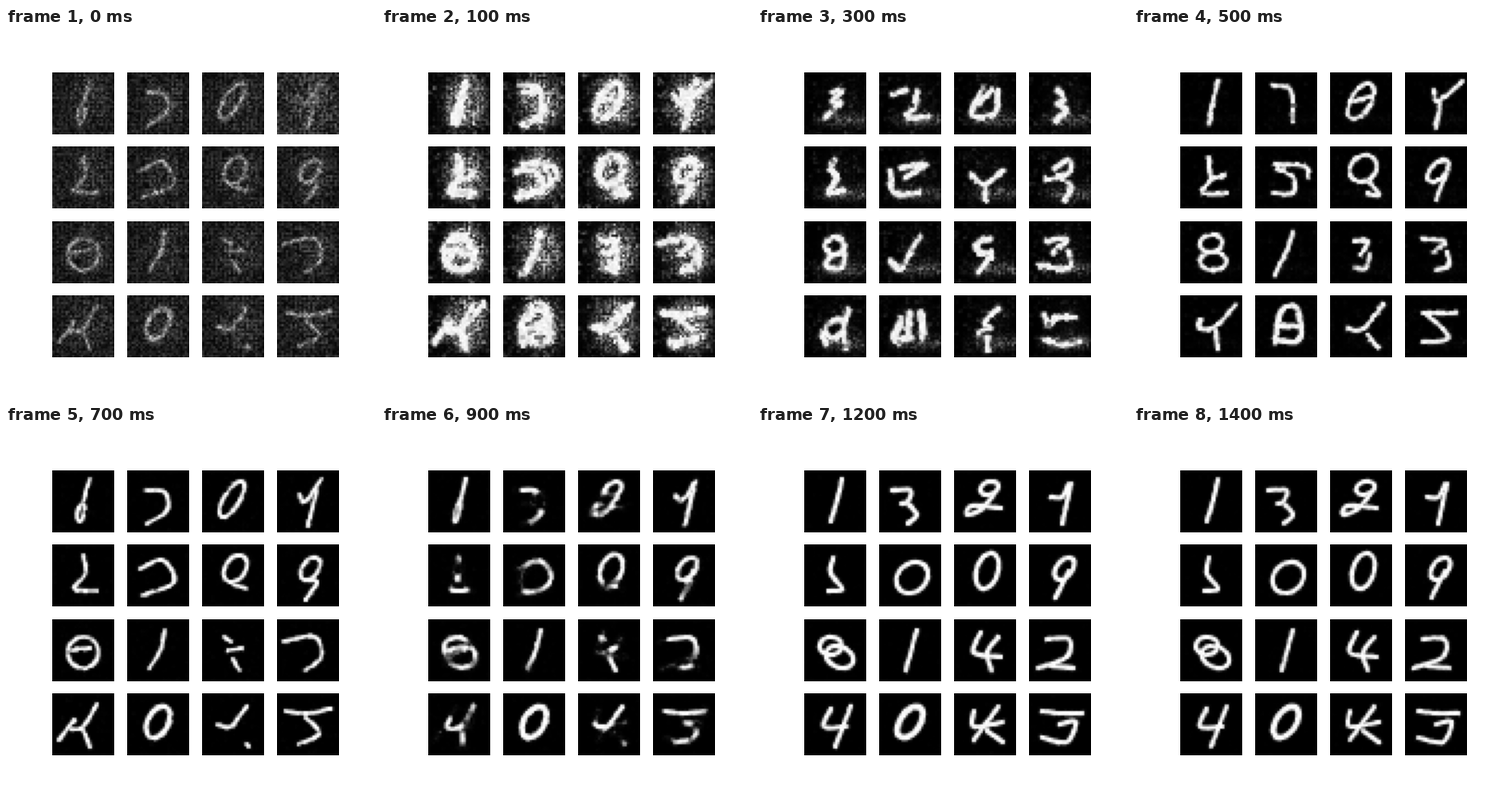
These frames come from a looping animation (400 px wide and 400 px high, 1.5 s). A matplotlib script:

```python
import numpy as np
import matplotlib.pyplot as plt
from matplotlib.animation import FuncAnimation

N = 28
FRAMES = 15
KEYS = [0, 1, 3, 5, 7, 11, 14]
Y, X = np.mgrid[0:N, 0:N] + 0.5
digits = []


def curve(stroke):
    """Catmull-Rom curve through the points of a stroke."""
    pts = np.reshape(stroke, (-1, 2)).astype(float)
    p = np.vstack([pts[:1], pts, pts[-1:]])
    t = np.linspace(0, 1, 24)[:, None]
    parts = [pts]
    for a, b, c, d in zip(p, p[1:], p[2:], p[3:]):
        parts.append(b + 0.5 * t * (c - a + t * (2 * a - 5 * b + 4 * c - d
                                                 + t * (3 * (b - c) + d - a))))
    return np.vstack(parts)


def oval(cx, cy, rx, ry, slant=0.0):
    a = np.linspace(0, 2 * np.pi, 13)
    dy = ry * np.sin(a)
    return np.column_stack([cx + rx * np.cos(a) - slant * dy, cy + dy])


def field(pose, width):
    """Signed soft distance to the strokes, positive inside the ink."""
    pts = np.vstack([curve(s) for s in pose])
    dist = np.hypot(X[..., None] - pts[:, 0], Y[..., None] - pts[:, 1]).min(-1)
    return np.clip(width + 0.5 - dist, -1, 1.25)


def digit(rough, shaped, late, final, bold=1.0):
    """One cell: four drawn poses, the two earliest states derive from them."""
    blob = shaped + late
    poses = [late, blob, rough, shaped, late, final, final]
    widths = [0.9, 1.6, 1.4, 1.05, 0.95, 1.15, 1.05]
    digits.append([field(p, w * bold) for p, w in zip(poses, widths)])


digit([(13, 9, 17, 8, 13, 13, 16, 14, 10, 20)],
      [(17, 4, 15, 12, 13, 23)],
      [(17, 4, 14, 14), oval(13, 19, 1.5, 4, 0.2)],
      [(17, 4, 15, 13, 12, 23)])
digit([(6, 10, 12, 8), (17, 9, 16, 15, 13, 20, 22, 20)],
      [(8, 6, 16, 8, 17, 22)],
      [(9, 9, 17, 10, 18, 18, 9, 24)],
      [(6, 9, 14, 9, 13, 14, 10, 15), (13, 15, 17, 20, 13, 24)])
digit([(13, 7, 8, 19, 18, 19, 20, 8), (11, 14, 17, 8)],
      [oval(14, 13, 5, 8, 0.4), (11, 13, 18, 11)],
      [oval(13.5, 13, 4, 8, 0.5)],
      [oval(16, 8, 4, 3, 0.3), (20, 8, 13, 17, 6, 20, 8, 16, 21, 17)])
digit([(13, 8, 16, 12, 13, 14, 17, 17, 12, 22)],
      [(13, 8, 15, 13, 26, 4), (16, 13, 14, 25)],
      [(10, 11, 13, 14, 20, 4), (18, 9, 14, 25)],
      [(10, 12, 15, 12, 18, 6), (19, 6, 15, 24)])
digit([(14, 6, 12, 10, 15, 14, 11, 21, 18, 20)],
      [(13, 5, 14, 14, 20, 13), (15, 14, 10, 21, 21, 21)],
      [(14, 5, 15, 13, 10, 20, 20, 21)],
      [(13, 6, 12, 13, 17, 20, 11, 21)])
digit([(5, 11, 7, 21, 18, 21), (10, 10, 21, 8, 12, 14)],
      [(9, 8, 22, 9, 24, 14), (10, 10, 17, 14, 17, 21, 8, 21)],
      [(6, 11, 16, 7, 21, 17, 7, 23)],
      [oval(15, 15, 7, 7, 0.2)])
digit([(8, 13, 14, 17, 22, 11), (14, 17, 14, 24)],
      [oval(15, 10, 6, 6, 0.2), (18, 16, 22, 22, 17, 21)],
      [oval(15, 11, 5, 6, 0.3), (14, 18, 20, 20)],
      [oval(15, 12, 5, 8, 0.2)])
digit([(12, 10, 18, 6, 18, 12, 8, 15), (13, 13, 19, 18, 16, 24)],
      [oval(15, 11, 4, 5, 0.5), (20, 8, 14, 24)],
      [oval(15, 11, 4, 5, 0.4), (12, 16, 18, 17, 13, 25)],
      [oval(16, 11, 4, 5, 0.4), (18, 12, 12, 24)])
digit([oval(14, 11, 4, 4), (18, 12, 17, 21, 10, 20, 12, 15)],
      [oval(14, 10, 5, 4, 0.1), oval(15, 18, 6, 4)],
      [oval(14, 15, 7, 7), (9, 14, 17, 13)],
      [oval(12, 12, 5, 4), oval(16, 17, 6, 5, -0.3)])
digit([(18, 7, 10, 22), (5, 18, 9, 22)],
      [(17, 5, 14, 14, 9, 24)],
      [(17, 5, 15, 14, 10, 22)],
      [(17, 5, 12, 23)])
digit([(16, 8, 10, 10, 12, 14, 17, 15, 11, 23)],
      [(11, 9, 17, 9, 14, 15), (18, 15, 16, 21, 11, 21)],
      [(10, 8, 13, 10), (12, 14, 18, 13), (14, 18, 17, 23)],
      [(12, 6, 9, 15, 21, 17), (20, 8, 15, 15, 17, 23)])
digit([(8, 9, 17, 8, 11, 14), (5, 20, 18, 21, 18, 14)],
      [(8, 8, 18, 9, 13, 14), (19, 14, 20, 20, 14, 22)],
      [(3, 10, 17, 8, 20, 17, 13, 23)],
      [(8, 9, 18, 9, 17, 17, 4, 22), (10, 21, 20, 22)])
digit([oval(14, 15, 4, 4, 0.3), (20, 6, 18, 16, 19, 24), (8, 17, 10, 22)],
      [(9, 11, 9, 15, 16, 14, 25, 4), (16, 15, 17, 24)],
      [(10, 12, 3, 21), (8, 16, 14, 15, 20, 5), (14, 16, 17, 24)],
      [(12, 7, 9, 15, 19, 15), (21, 6, 14, 24)])
digit([(10, 11, 7, 20, 14, 19), (14, 8, 13, 19), (19, 8, 20, 19)],
      [(9, 21, 12, 7, 19, 6, 20, 20, 9, 20), (10, 14, 19, 14)],
      [oval(14, 13, 5, 7, 0.3)],
      [oval(14, 13, 5, 7, 0.4)], bold=1.3)
digit([(20, 6, 14, 12, 16, 15, 11, 17), (15, 17, 15, 25)],
      [(8, 15, 15, 15, 24, 4), (17, 18, 22, 24)],
      [(7, 14, 13, 15, 20, 6), (20, 23, 21, 24)],
      [(9, 8, 9, 15, 22, 13), (20, 6, 9, 21), (15, 17, 22, 22)])
digit([(7, 9, 9, 13, 13, 10, 21, 10), (7, 20, 15, 22, 23, 21)],
      [(8, 8, 23, 8), (10, 9, 17, 15, 19, 20, 8, 21)],
      [(4, 8, 14, 9, 24, 7), (13, 11, 19, 18, 10, 23)],
      [(6, 8, 14, 9, 24, 9), (14, 14, 21, 13, 17, 22, 6, 20)])


haze = np.exp(-(((X - 16) / 10) ** 2 + ((Y - 13) / 12) ** 2) ** 2) * (0.35 + 0.65 * X / N)
floor = np.exp(-((Y - 21.5) / 3) ** 2) * np.clip((X - 2) / 12, 0, 1)
mesh = 0.7 + 0.3 * (X % 2 < 1) + 0.25 * (Y % 2 > 1)


def fade(frame, *levels):
    """Level at a frame, holding the last one after the listed keys."""
    return np.interp(frame, KEYS[:len(levels)], levels)


def render(frame, cell):
    rng = np.random.default_rng(100 * frame + cell)
    poses = digits[cell]
    k = min(np.searchsorted(KEYS, frame, side="right") - 1, len(KEYS) - 2)
    u = (frame - KEYS[k]) / (KEYS[k + 1] - KEYS[k])
    f = (1 - u) * poses[k] + u * poses[k + 1]
    ragged = np.kron(rng.normal(size=(N // 2, N // 2)), np.ones((2, 2)))
    f = f + ragged * fade(frame, 0.2, 0.3, 0.3, 0.2, 0.15, 0.08)

    speck = rng.uniform(0.1, 1, (N, N)) * mesh
    grain = 1 - rng.random((N, N)) * fade(frame, 0.65, 0.1, 0.1, 0.08, 0.04)
    ink = np.clip(f, 0, 1) * grain * fade(frame, 0.8, 1)
    tone = 0.3 if cell == 3 else 0.19
    back = speck * (tone * fade(frame, 1, 0.15, 0)
                    + haze * fade(frame, 0.16, 0.95, 0.08, 0)
                    + floor * fade(frame, 0, 0.1, 0.36, 0.03, 0))
    glow = np.clip(f + 1, 0, 1) * speck * fade(frame, 0.1, 0.5, 0.2, 0.1, 0.06)
    return np.clip(np.maximum(ink, back + glow * (f < 0.3)), 0, 1)


fig, axes = plt.subplots(4, 4, figsize=(4, 4), dpi=100)
images = []
for ax in axes.flat:
    ax.axis("off")
    images.append(ax.imshow(np.zeros((N, N)), cmap="gray", vmin=0, vmax=1))


def update(frame):
    for cell, image in enumerate(images):
        image.set_data(render(frame, cell))
    return images


anim = FuncAnimation(fig, update, frames=FRAMES, interval=100, repeat=True)
plt.show()
```
